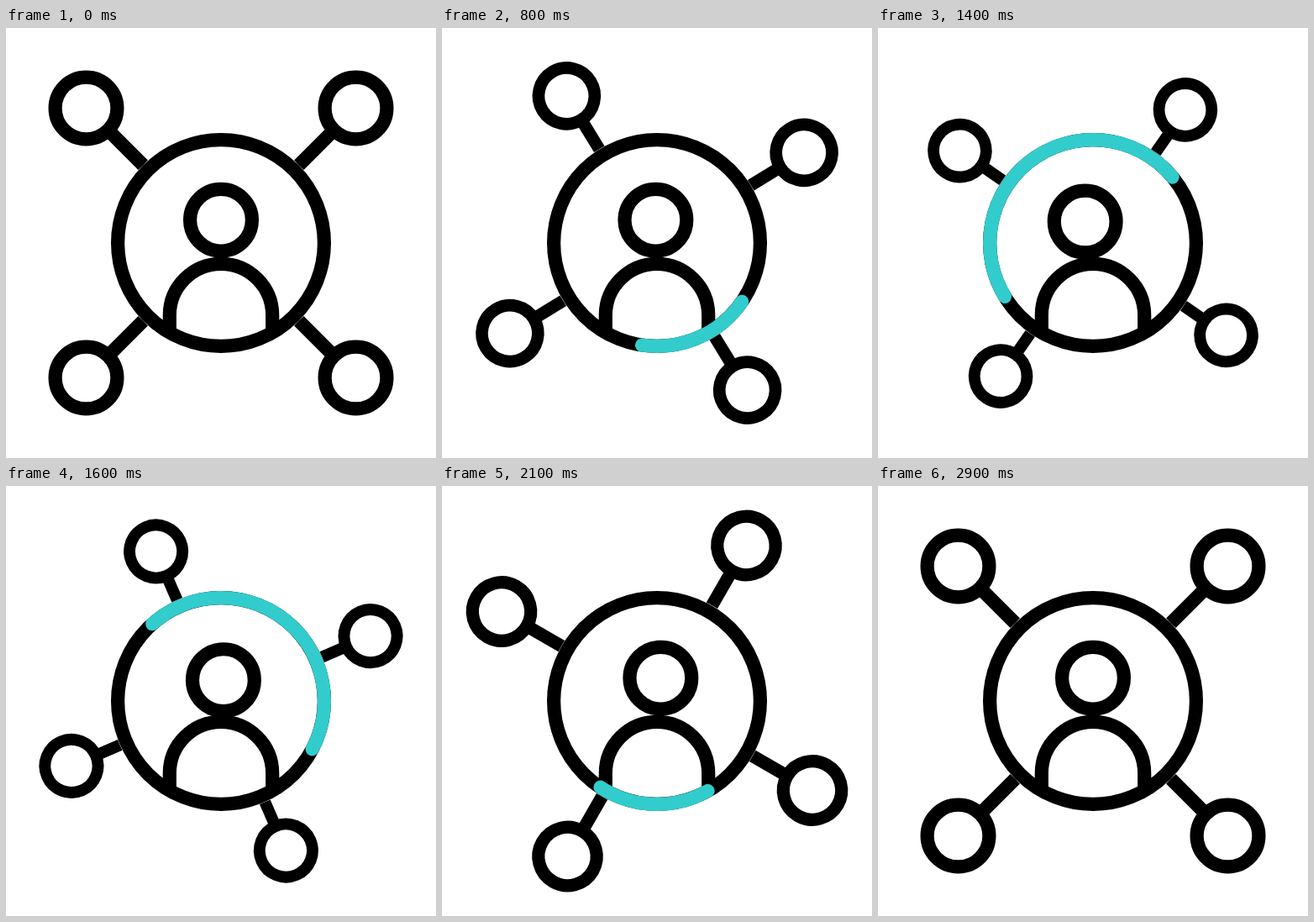
An HTML page that plays this animation: 512 px wide and 512 px high, repeating every 3 s.

```html
<!DOCTYPE html>
<html lang="en">
<head>
<meta charset="utf-8">
<title>Network</title>
<style>
  html, body { margin: 0; width: 100%; height: 100%; overflow: hidden; background: #fff; }
  svg { display: block; width: 100%; height: 100%; }
</style>
</head>
<body>
<svg viewBox="0 0 512 512" fill="none" stroke="#000" stroke-width="16.2">
  <g id="nodes"></g>
  <path d="M194.8 358V342a61.2 61.2 0 0 1 122.4 0V358"/>
  <circle id="head" cx="256" cy="228.7" r="36.9"/>
  <circle cx="256" cy="256" r="122.9"/>
  <path id="arc" stroke="#33cccc" stroke-linecap="round"/>
</svg>
<script>
const LOOP = 3000, STEP = 100, C = 256, RING = 122.9, EDGE = 131.2;
const $ = id => document.getElementById(id);
const nodes = $('nodes'), head = $('head'), arc = $('arc');

nodes.innerHTML = [-45, 45, 135, 225].map(a =>
  `<g transform="rotate(${a})"><line x2="191"/><circle cx="227" r="36.9"/></g>`).join('');
const spokes = nodes.querySelectorAll('line');

const clamp = v => Math.min(1, Math.max(0, v));
const smooth = s => s * s * (3 - 2 * s);

// Ease along cubic-bezier(a, 0, 1 - a, 1)
function ease(t, from, to, a) {
  const x = clamp((t - from) / (to - from));
  let lo = 0, hi = 1;
  for (let i = 0; i < 30; i++) {
    const s = (lo + hi) / 2;
    if (smooth(s) + 3 * a * s * (1 - s) * (1 - 2 * s) < x) lo = s; else hi = s;
  }
  return smooth((lo + hi) / 2);
}
const ramp = (t, from, to) => smooth(clamp((t - from) / (to - from)));

// Smooth curve through [time, value] keys
function follow(keys, t) {
  const last = keys.length - 1;
  if (t <= keys[0][0]) return keys[0][1];
  if (t >= keys[last][0]) return keys[last][1];
  const i = keys.findIndex(k => k[0] > t) - 1;
  const slope = j => {
    const p = keys[Math.max(0, j - 1)], n = keys[Math.min(last, j + 1)];
    return (n[1] - p[1]) / (n[0] - p[0]);
  };
  const [t0, v0] = keys[i], [t1, v1] = keys[i + 1];
  const d = t1 - t0, u = (t - t0) / d, w = smooth(u);
  return v0 + (v1 - v0) * w
    + d * u * (1 - u) * ((1 - u) * slope(i) - u * slope(i + 1));
}

const ARC_ON = 470, ARC_OFF = 2460;
const tail = [[ARC_ON, 22], [800, 34.6], [1200, 82.5], [1600, 228.3], [2100, 420.5], [ARC_OFF, 503]];
const tip = [[ARC_ON, 22], [800, 98.4], [1200, 243.4], [1600, 387.8], [2100, 483.3], [ARC_OFF, 503]];

function point(deg) {
  const a = deg * Math.PI / 180;
  return `${(C + RING * Math.cos(a)).toFixed(2)} ${(C + RING * Math.sin(a)).toFixed(2)}`;
}

function draw(t) {
  const turn = 180 * ease(t, 264, 2664, 0.535);
  const scale = 1 - 0.15 * (ease(t, 264, 1210, 0.5) - ease(t, 1410, 2660, 0.5));
  nodes.setAttribute('transform', `translate(${C} ${C}) rotate(${turn}) scale(${scale})`);
  spokes.forEach(s => s.setAttribute('x1', EDGE / scale));

  const dx = -14.5 * ramp(t, 690, 1220) + 29 * ramp(t, 1220, 1890) - 14.5 * ramp(t, 1890, 2220);
  const dy = 2.5 * Math.sin(Math.PI * clamp((t - 1220) / 670));
  head.setAttribute('transform', `translate(${dx} ${dy})`);

  const on = t > ARC_ON && t < ARC_OFF;
  arc.style.display = on ? '' : 'none';
  if (on) {
    const a = follow(tail, t), b = follow(tip, t);
    arc.setAttribute('d', `M${point(a)}A${RING} ${RING} 0 ${b - a > 180 ? 1 : 0} 1 ${point(b)}`);
  }
}

// The motion advances at ten steps per second
const start = performance.now();
function tick() {
  const t = (performance.now() - start) % LOOP;
  draw(Math.floor(t / STEP) * STEP);
  requestAnimationFrame(tick);
}
tick();
</script>
</body>
</html>
```
